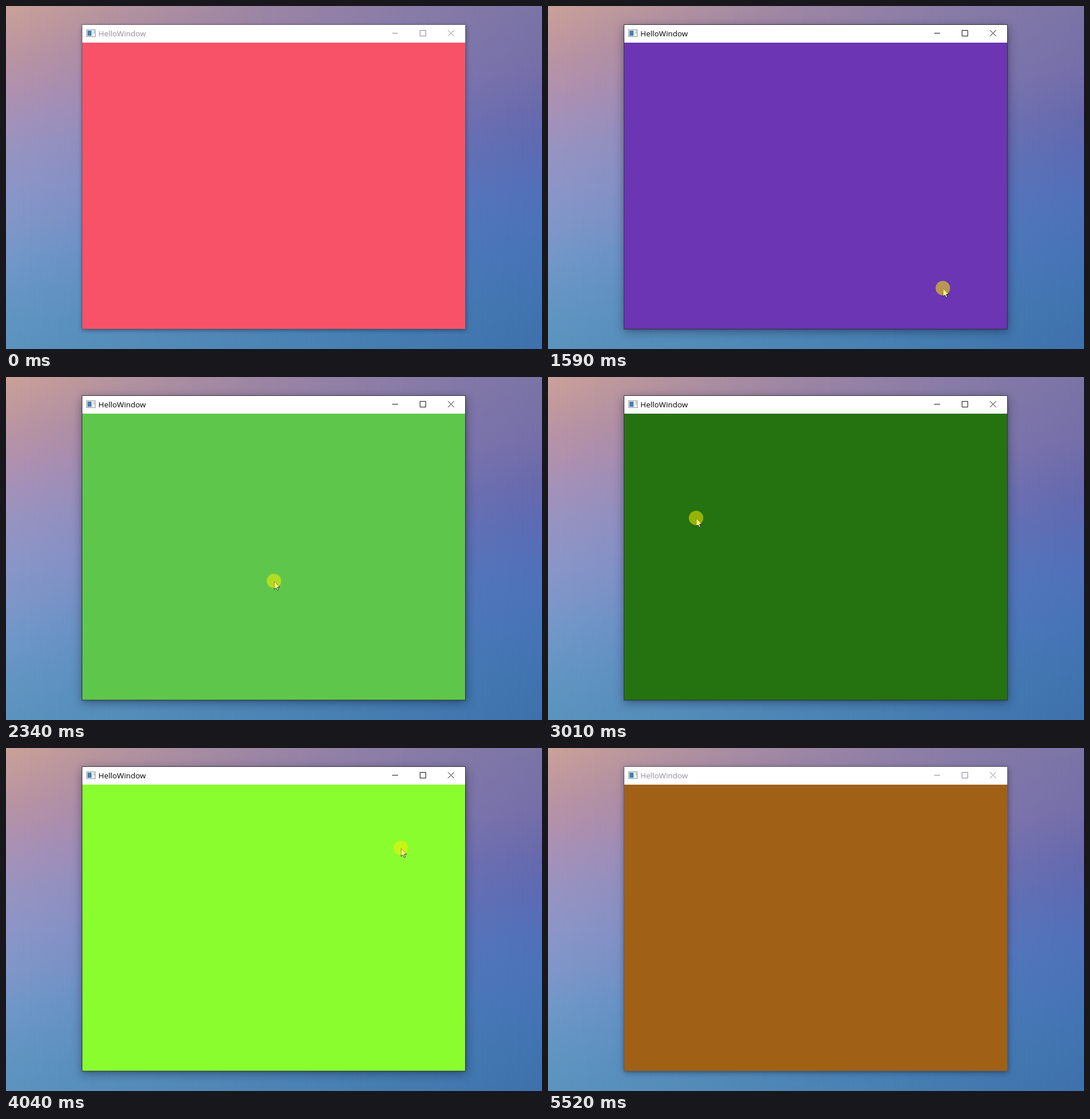
An HTML page for the animation above (5580 ms loop, 934 by 599 pixels).

```html
<!DOCTYPE html>
<html lang="en">
<head>
<meta charset="utf-8">
<title>HelloWindow</title>
<style>
  html, body { margin: 0; width: 100%; height: 100%; overflow: hidden; }
  .stage { position: relative; width: 934px; height: 599px; overflow: hidden; }
  .stage > * { position: absolute; }
  .wall { inset: 0; }
  .left {
    background: linear-gradient(170deg, rgb(204,161,152), rgb(185,148,164) 13%, rgb(176,145,176) 20%,
      rgb(164,146,186) 26%, rgb(150,148,194) 34%, rgb(140,150,200) 42%, rgb(126,151,201) 52%,
      rgb(112,152,200) 59%, rgb(100,150,195) 68%, rgb(91,148,190) 78%, rgb(80,150,180));
  }
  .right {
    background: linear-gradient(170deg, rgb(122,116,165) 21%, rgb(118,110,168) 35%, rgb(104,105,172) 45%,
      rgb(92,106,178) 54%, rgb(80,112,185) 65%, rgb(70,115,182) 78%, rgb(64,115,175) 90%, rgb(62,112,172));
    -webkit-mask-image: linear-gradient(90deg, transparent, #000);
    mask-image: linear-gradient(90deg, transparent, #000);
  }
  .shadow { left: 133px; top: 33px; width: 668px; height: 531px; }
  svg { left: 0; top: 0; display: block; }
  text { font: 13.4px "Open Sans", "Noto Sans", sans-serif; }
</style>
</head>
<body>
<div class="stage">
  <div class="wall left"></div>
  <div class="wall right"></div>
  <div class="shadow" id="shadow"></div>
  <svg width="934" height="599" viewBox="0 0 934 599">
    <rect x="133" y="33" width="667.5" height="31" fill="#fff"/>
    <rect id="client" x="133" y="64" width="667.5" height="500"/>
    <rect id="border" x="132.5" y="32.5" width="668" height="531.7" fill="none"/>
    <g id="icon">
      <rect x="140.5" y="41.5" width="15" height="12" fill="#f6f7f9" stroke="#8d939c"/>
      <rect x="142" y="43" width="7" height="9" fill="#4480b0"/>
      <path d="M150.5 43V52" stroke="#c9d4df"/>
      <path d="M153.5 43.5V48" stroke="#8a97a6"/>
    </g>
    <text id="title" x="161" y="52.7">HelloWindow</text>
    <path id="buttons" d="M673 47.5H683M721.5 42.5H731.5V52.5H721.5ZM770.3 42.3L780.7 52.7M780.7 42.3L770.3 52.7" fill="none"/>
    <g id="cursor">
      <path d="M.5 .5V14.2L3.6 11.4L5.8 16.2L7.9 15.2L5.8 10.6H10Z" fill="#fff" stroke="#222" stroke-width=".9"/>
      <circle id="press" cy="-.3" r="12.6" fill="#fff000" fill-opacity=".52"/>
    </g>
  </svg>
</div>
<script>
const LOOP = 5580, TICK = 67.6, ENTER = 990, LEAVE = 4790, BLUR = 5520;
const el = id => document.getElementById(id);
const set = (id, attrs) => { for (const k in attrs) el(id).setAttribute(k, attrs[k]); };

// time, press length, client colour
const clicks = [
  [1590, 70, 'rgb(107,53,179)'],
  [2340, 130, 'rgb(94,199,75)'],
  [3010, 70, 'rgb(37,115,16)'],
  [3480, 70, 'rgb(78,127,24)'],
  [4040, 60, 'rgb(138,253,46)'],
  [4590, 70, 'rgb(160,96,22)']
];
// start, end, x, y
const moves = [
  [930, 1455, 688, 493],
  [1865, 2205, 467, 356.5],
  [2605, 2945, 258, 246.5],
  [3020, 3420, 238, 381],
  [3485, 3825, 685, 174],
  [3900, 3900, 688, 175],
  [4050, 4500, 458.5, 195.5],
  [4660, 4660, 545, 295],
  [4720, 4720, 741, 515]
];

const clamp = v => Math.min(1, Math.max(0, v));
const ease = p => p * p * (3 - 2 * p);

function cursorAt(t) {
  // the pointer is sampled at a fixed rate
  const tick = ENTER + Math.floor((t - ENTER + 10) / TICK) * TICK;
  let x = 548, y = 599;
  for (const [a, b, mx, my] of moves) {
    if (t < a) break;
    const p = a === b ? 1 : ease(clamp((tick - a) / (b - a)));
    x += (mx - x) * p;
    y += (my - y) * p;
  }
  return `translate(${x.toFixed(1)} ${y.toFixed(1)})`;
}

function shadowAt(t) {
  if (t >= BLUR) return '0 2px 7px rgba(15,20,40,.42), 0 3px 16px rgba(15,20,40,.16)';
  if (t < clicks[0][0]) return '0 2px 7px rgba(15,20,40,.5)';
  return '0 4px 16px rgba(15,20,40,.46), 0 1px 4px rgba(15,20,40,.2)';
}

function draw(t) {
  const active = t >= clicks[0][0] && t < BLUR;
  const last = clicks.filter(c => t >= c[0]).pop();
  const shown = t >= ENTER && t < LEAVE;
  const pressed = last && t < last[0] + last[1];

  el('shadow').style.boxShadow = shadowAt(t);
  set('client', { fill: last ? last[2] : 'rgb(248,82,104)' });
  set('border', { stroke: active ? 'rgba(45,42,55,.85)' : 'rgba(85,80,105,.6)' });
  set('title', { fill: active ? '#000' : '#948a9c' });
  set('buttons', { stroke: active ? '#111' : '#8b8298' });
  set('cursor', { visibility: shown ? 'visible' : 'hidden' });
  set('press', { opacity: pressed ? 1 : 0 });
  if (shown) set('cursor', { transform: cursorAt(t) });
}

const start = performance.now();
function frame() {
  draw((performance.now() - start) % LOOP);
  requestAnimationFrame(frame);
}
draw(0);
requestAnimationFrame(frame);
</script>
</body>
</html>
```
